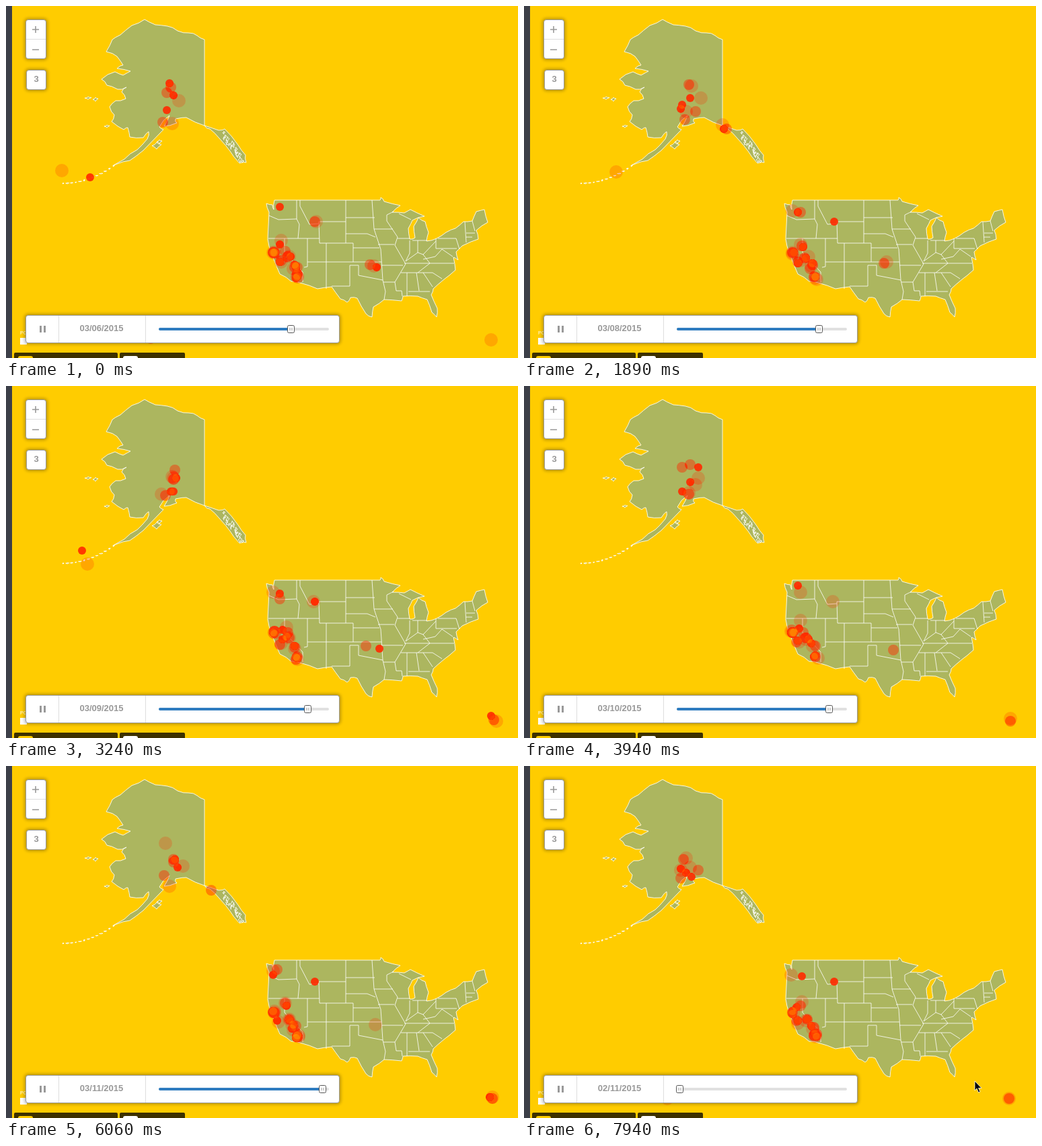
Recreate the animation shown at these times as an HTML page with a canvas. Size 761 by 524 pixels, loop 8 s.

```html
<!DOCTYPE html>
<html lang="en">
<head>
<meta charset="utf-8">
<title>Event map</title>
<style>
  html, body { margin: 0; width: 100%; height: 100%; overflow: hidden; background: #fc0; }
  svg, canvas, .box { position: absolute; left: 0; top: 0; }
  .box { box-sizing: border-box; background: #fff; border: 1px solid #999; border-radius: 4px;
         box-shadow: 0 0 4px 2px rgba(0,0,0,.25); }
  text { font: bold 13px "Liberation Sans", Arial, sans-serif; fill: #999; text-anchor: middle; }
  #land { fill: #acb65f; stroke: #fff; stroke-opacity: .85; stroke-linejoin: round; }
  #borders { fill: none; stroke: #fff; stroke-opacity: .8; }
  .line { stroke: #ddd; }
  .icon { stroke: #999; stroke-width: 1.6; }
</style>
</head>
<body>
<svg width="761" height="524">
  <g id="land"></g>
  <g id="borders">
    <!-- west -->
    <path d="M391 312L405 318 432 317M432 289V317L436 325 434 346M390 346H466M414 346V367L441 396V411M448 346V388L443 389M437 289V298L451 325 465 324M505 321H465L466 353H516"/>
    <!-- plains -->
    <path d="M476 353V421M448 381H558M516 353V381M505 289V353M516 360H555M505 315H548M505 339H537L549 344M484 417H511V386H524V401L560 408M544 289L547 332H575M547 332L557 362 560 408 564 425 562 437M553 355H577"/>
    <!-- Mississippi and Ohio valleys -->
    <path d="M576 306L566 311V320L582 344 578 356 594 384 578 411 580 424H588L589 432M582 346H600M558 386H590M561 411H578M600 349V368L594 380 612 367 620 370 639 350M612 349V367M604 349H626M584 309L602 318"/>
    <!-- east -->
    <path d="M639 346V361H670M642 346H669L674 362M592 383H666M587 397H634L648 406M596 397V432M610 397L614 424M598 425H630M620 397L634 418M612 397L630 383 620 370M620 377L638 373 648 362 664 373M682 321L684 352M693 320L697 335M684 338H697M684 344H693"/>
  </g>
</svg>
<canvas width="761" height="524"></canvas>
<svg width="761" height="524">
  <rect width="9" height="524" fill="#3c3f48"/>
  <path d="M12 524V518Q12 516 14 516H164Q166 516 166 518V524ZM169 524V518Q169 516 171 516H264Q266 516 266 518V524Z" fill="#3d3100"/>
  <rect x="18" y="521" width="22" height="10" rx="3" fill="#fc0"/>
  <rect x="174" y="521" width="22" height="10" rx="3" fill="#fff"/>
  <rect x="21" y="494" width="10" height="10" fill="#fff"/>
  <text x="21" y="489" style="font-size:7px;font-weight:normal;fill:#fff;text-anchor:start">POWERED BY</text>
</svg>
<div class="box" style="left:29px;top:20px;width:31px;height:59px"></div>
<div class="box" style="left:30px;top:95px;width:30px;height:30px"></div>
<div class="box" style="left:29px;top:460px;width:467px;height:42px"></div>
<svg width="761" height="524">
  <path class="line" d="M30 49.500H59M78.500 461V501M207.500 461V501"/>
  <path class="icon" d="M39 35H49M44 30V40M39 65H49"/>
  <text x="45" y="113">3</text>
  <path d="M50 476h3v10h-3zM56 476h3v10h-3z" fill="#999"/>
  <text id="date" x="142" y="484"></text>
  <rect x="227" y="479" width="253" height="4" rx="2" fill="#e0e0e0"/>
  <rect id="fill" x="227" y="479" height="4" rx="2" fill="#2e7cc0"/>
  <g id="handle">
    <rect x="-5" y="475.500" width="10" height="11" rx="2" fill="#fff" stroke="#555"/>
    <path d="M-1.500 479V483M1.500 479V483" stroke="#999"/>
  </g>
  <path id="cursor" d="M670 469V483L673 480 675.500 486 678 485 675.500 479.500H680Z" stroke="#fff" stroke-width=".8"/>
</svg>
<script>
const $ = selector => document.querySelector(selector);

function seeded(seed) {
  return () => {
    seed = seed + 0x6d2b79f5 | 0;
    let h = Math.imul(seed ^ seed >>> 15, seed | 1);
    h ^= h + Math.imul(h ^ h >>> 7, h | 61);
    return ((h ^ h >>> 14) >>> 0) / 4294967296;
  };
}

// Closed outline through key points; short edges are coast and get a ragged middle, long ones are borders.
function coastline(text, roughness) {
  const random = seeded(5);
  const jitter = () => (random() - .5) * 2 * roughness;
  const points = text.split(" ").map(p => p.split(",").map(Number));
  const path = points.flatMap(([x, y], i) => {
    const [nx, ny] = points[(i + 1) % points.length];
    const isCoast = Math.hypot(nx - x, ny - y) < 40;
    return isCoast ? [[x, y], [(x + nx) / 2 + jitter(), (y + ny) / 2 + jitter()]] : [[x, y]];
  });
  return `M${path.join("L")}Z`;
}

const alaska = "206,20 187,29 170,43 158,50 149,68 165,75 174,88 165,93 185,97 174,103 162,98 " +
  "142,109 150,118 166,124 179,121 172,128 178,138 163,141 154,150 161,162 157,172 175,184 181,181 184,195 " +
  "204,196 212,187 210,198 195,214 176,228 160,237 184,230 204,215 234,184 228,180 243,163 235,179 254,174 " +
  "252,168 268,166 295,178 316,185 325,183 345,207 356,222 357,233 347,234 333,216 318,198 303,183 " +
  "295,178 295,50 284,44 271,40 255,37 240,30 222,28";

const mainland = "387,294 396,296 398,303 399,289 556,289 557,285 562,291 586,297 574,307 592,308 601,303 " +
  "622,313 604,319 598,331 600,347 608,345 606,328 613,315 623,321 628,337 625,350 640,346 654,337 " +
  "668,331 680,321 693,320 699,306 711,303 716,322 699,334 702,347 678,357 669,366 672,378 665,374 " +
  "668,393 651,407 635,421 632,430 641,450 640,463 633,456 626,437 612,432 590,432 588,439 562,437 546,448 544,463 " +
  "535,458 522,435 512,434 507,441 497,436 484,418 463,421 437,412 424,410 407,399 394,367 389,347 391,307";

const islandCenters = [[122, 137, 5, 2], [133, 139, 4, 3], [150, 179, 4, 2], [224, 208, 7, 5], [228, 202, 4, 3]];
const island = ([x, y, rx, ry]) =>
  coastline(`${x - rx},${y} ${x},${y - ry} ${x + rx},${y - ry / 3} ${x},${y + ry}`, 1.5);

function chain(count, seed, place) {
  const random = seeded(seed);
  return Array.from({ length: count }, (_, i) => island(place(i / (count - 1), random)));
}
const aleutians = chain(13, 8, (t, random) =>
  [160 - 75 * t, 238 + 26 * t * (2 - t), 1 + 2 * random(), .5 + random()]);
const panhandle = chain(16, 3, (t, random) =>
  [322 + 28 * t + 8 * (random() - .5), 192 + 36 * t + 7 * (random() - .5), 1 + 2 * random(), 2 + 3 * random()]);

$("#land").innerHTML = [coastline(alaska, 1.5), coastline(mainland, 1), ...islandCenters.map(island),
  ...aleutians, ...panhandle].map(d => `<path d="${d}"/>`).join("");

// Active regions: center, spread and mean number of events per step.
const regions = [
  { x: 248, y: 138, dx: 18, dy: 30, rate: 1.8 },
  { x: 238, y: 165, dx: 18, dy: 16, rate: 1 },
  { x: 305, y: 182, dx: 18, dy: 8, rate: .3 },
  { x: 140, y: 248, dx: 70, dy: 18, rate: .4 },
  { x: 405, y: 306, dx: 12, dy: 14, rate: .7 },
  { x: 460, y: 322, dx: 5, dy: 3, rate: .4 },
  { x: 399, y: 367, dx: 2, dy: 2, rate: 1.5 },
  { x: 412, y: 357, dx: 8, dy: 12, rate: .9 },
  { x: 407, y: 381, dx: 5, dy: 4, rate: .9 },
  { x: 421, y: 375, dx: 5, dy: 4, rate: 1 },
  { x: 428, y: 388, dx: 5, dy: 6, rate: 1.3 },
  { x: 433, y: 403, dx: 4, dy: 4, rate: 1.8 },
  { x: 545, y: 387, dx: 14, dy: 10, rate: .5 },
  { x: 723, y: 496, dx: 7, dy: 7, rate: .6 },
  { x: 213, y: 497, dx: 2, dy: 4, rate: .15 }
];
const toGrid = v => 2 * Math.floor(v / 2) + 1;

function eventsAt(step) {
  const random = seeded(step * 7919 + 17);
  const around = (center, spread) => toGrid(center + spread * (random() + random() - 1));
  return regions.flatMap(({ x, y, dx, dy, rate }) =>
    Array.from({ length: Math.floor(rate + random()) }, () => [around(x, dx), around(y, dy)]));
}

// Each event grows and fades over three steps.
const ctx = $("canvas").getContext("2d");
function drawEvents(step) {
  ctx.clearRect(0, 0, 761, 524);
  ctx.globalCompositeOperation = "lighter";
  ctx.fillStyle = "#ff2900";
  for (let age = 0; age < 3; age++) {
    ctx.globalAlpha = .9 / 2 ** age;
    for (const [x, y] of eventsAt(step - age)) {
      ctx.beginPath();
      ctx.arc(x, y, 6 + 2 * age, 0, 7);
      ctx.fill();
    }
  }
}

const track = { left: 227, width: 253 };
function drawPlayer(step) {
  const progress = (196.99 + step * .649) / track.width % 1;
  const offset = Math.floor(progress * track.width) + .5;
  $("#handle").setAttribute("transform", `translate(${track.left + offset})`);
  $("#fill").setAttribute("width", offset);
  const days = 10.13 + 30 * progress;
  const [year, month, day] = new Date(Date.UTC(2015, 1, 1) + days * 864e5).toISOString().slice(0, 10).split("-");
  $("#date").textContent = `${month}/${day}/${year}`;
  $("#cursor").style.display = step >= 90 ? "" : "none";
}

const duration = 8000, stepTime = 84.84;
let shown = -1;
const start = performance.now();
function frame() {
  const time = (performance.now() - start) % duration;
  const step = Math.floor((time + 35) / stepTime);
  if (step !== shown) {
    drawEvents(step);
    drawPlayer(step);
    shown = step;
  }
  requestAnimationFrame(frame);
}
frame();
</script>
</body>
</html>
```
